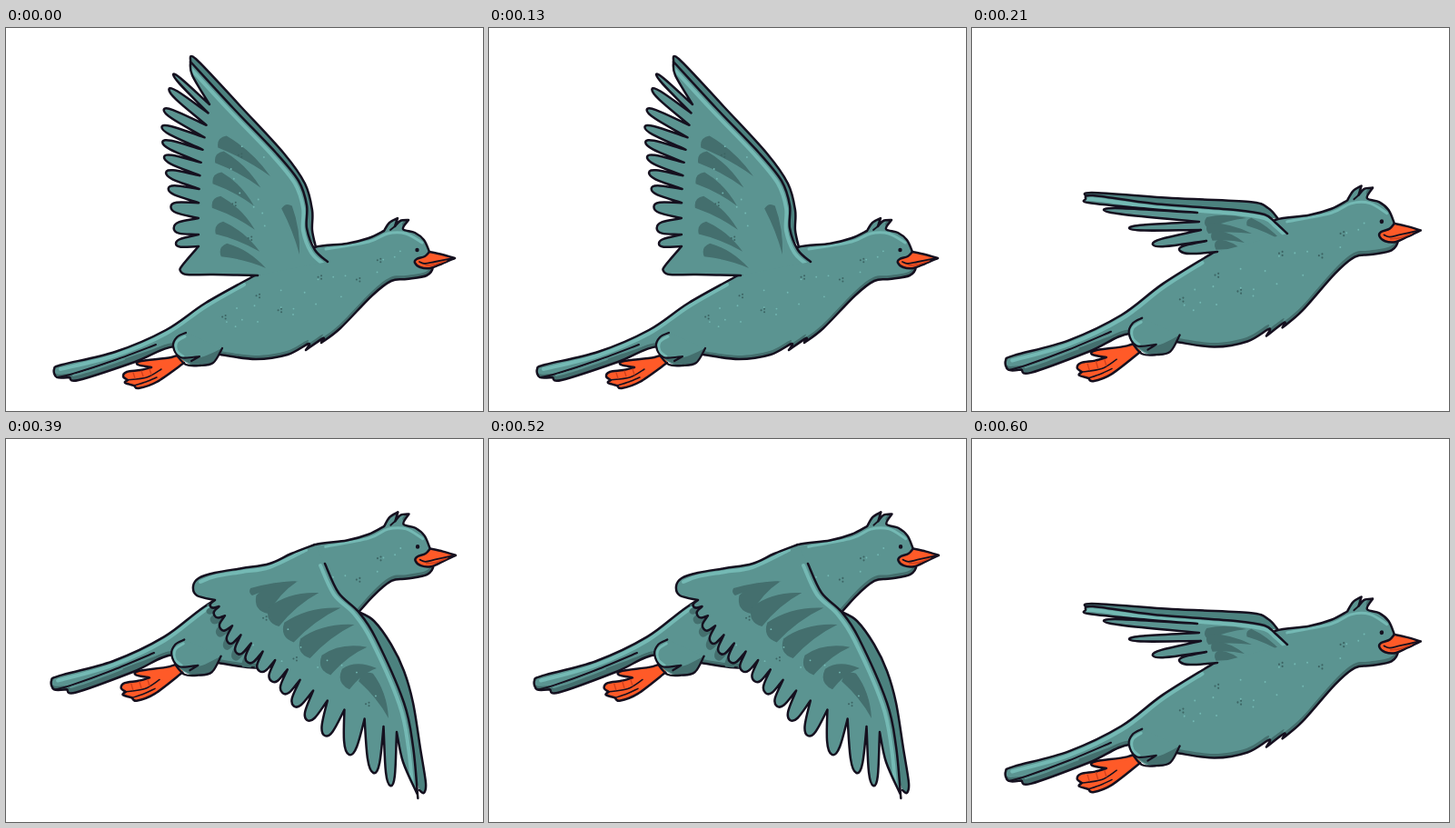
Recreate the animation shown at these times as an HTML page. Size 525 px wide and 421 px high, loop 780 ms.

```html
<!DOCTYPE html>
<html lang="en">
<head>
<meta charset="utf-8">
<title>Flying bird</title>
<style>
html, body { margin: 0; width: 100%; height: 100%; overflow: hidden; background: #fff; }
svg { display: block; width: 525px; height: 421px; }
path { vector-effect: non-scaling-stroke; }
</style>
</head>
<body>
<svg id="stage" viewBox="0 0 525 421" xmlns="http://www.w3.org/2000/svg"></svg>
<script>
const INK = '#15101f', MAIN = '#5b9491', LIGHT = '#74b9b4', DARK = '#446f6e';
const ORANGE = '#ff5a28', RUST = '#cf3f1c';

const points = text => text.trim().split(/\s+/).map(q => q.split(',').map(Number));
const mix = (a, b, t) => a.map((v, k) => v + (b[k] - v) * t);

// Point at share u (0 to 1) of a smooth curve through the keys.
function along(keys, u) {
  const n = keys.length - 1;
  const i = Math.min(n - 1, Math.floor(u * n)), t = u * n - i;
  const [a, b, c, d] = [i - 1, i, i + 1, i + 2].map(k => keys[Math.max(0, Math.min(n, k))]);
  return b.map((v, k) => v + t / 2 * (c[k] - a[k]
    + t * (2 * a[k] - 5 * v + 4 * c[k] - d[k] + t * (3 * (v - c[k]) + d[k] - a[k]))));
}

function spline(p) {
  let d = '';
  for (let i = 0; i < p.length - 1; i++) {
    const a = p[i], b = p[i + 1], before = p[i - 1] || a, after = p[i + 2] || b;
    const c1 = a.map((v, k) => v + (b[k] - before[k]) / 6);
    const c2 = b.map((v, k) => v - (after[k] - a[k]) / 6);
    d += `C${c1} ${c2} ${b}`;
  }
  return d;
}

// Row of rounded feathers: tips on one curve, gaps between them on another.
function fan(count, tipKeys, gapKeys) {
  const tips = points(tipKeys), gaps = points(gapKeys);
  let d = '';
  for (let i = 0; i < count; i++) {
    const a = along(gaps, i / count), b = along(gaps, (i + 1) / count);
    const tip = along(tips, i / (count - 1));
    const span = Math.hypot(a[0] - b[0], a[1] - b[1]);
    const w = Math.min(8, span * 0.45) / span;
    const push = (p, s) => p.map((v, k) => v + s * (a[k] - b[k]));
    d += `C${push(mix(a, tip, 0.5), 0.15)} ${push(tip, w)} ${tip}`
      + `C${push(tip, -w)} ${push(mix(b, tip, 0.5), -0.15)} ${b}`;
  }
  return { d, end: gaps[gaps.length - 1] };
}

// Joins smooth runs, with a corner at each "|", and feather rows.
function path(...parts) {
  let d = '', last;
  for (const part of parts) {
    if (part.d) {
      d += part.d;
      last = part.end;
      continue;
    }
    for (const run of part.split('|')) {
      const p = points(run);
      if (last) p.unshift(last); else d = 'M' + p[0];
      d += spline(p);
      last = p[p.length - 1];
    }
  }
  return d;
}

const fill = (d, color) => `<path d="${d}Z" fill="${color}"/>`;
const line = (d, color = INK, w = 2) => `<path d="${d}" fill="none" stroke="${color}" stroke-width="${w}"/>`;
const inked = (d, color = MAIN) => fill(d, color) + line(d, INK, 2.5);
const move = (at, content) => `<g transform="translate(${at})">${content}</g>`;
const dot = ([x, y], color, r) => `<circle cx="${x}" cy="${y}" r="${r}" fill="${color}"/>`;

let clips = 0;
function inside(d, content, matrix = '1 0 0 1 0 0') {
  const id = 'clip' + clips++;
  return `<clipPath id="${id}"><path d="${d}Z" transform="matrix(${matrix})"/></clipPath>`
    + `<g clip-path="url(#${id})">${content}</g>`;
}

// Leaf with a round tip of radius r, narrowing to a point at the end.
function leaf(tip, end, r) {
  const len = Math.hypot(end[0] - tip[0], end[1] - tip[1]);
  const ux = (end[0] - tip[0]) / len * r, uy = (end[1] - tip[1]) / len * r;
  const mid = mix(tip, end, 0.5);
  const off = ([x, y], s) => [x + uy * s, y - ux * s];
  return fill(`M${end}Q${off(mid, 1.4)} ${off(tip, 1)}Q${[tip[0] - ux, tip[1] - uy]} ${off(tip, -1)}Q${off(mid, 0)} ${end}`, DARK);
}

function coverts(count, tipKeys, endKeys, r) {
  const tips = points(tipKeys), ends = points(endKeys);
  return Array.from({ length: count }, (_, i) => i / (count - 1))
    .map(u => leaf(along(tips, u), along(ends, u), r)).join('');
}

let seed = 7;
const random = () => (seed = seed * 16807 % 2147483647) / 2147483647;

// Pale specks and dark triple dots scattered around a line.
function specks(from, to, spread, count) {
  let out = '';
  for (let i = 0; i < count; i++) {
    const [x, y] = mix(from, to, (i + random()) / count).map(v => v + (random() - 0.5) * 2 * spread);
    out += i % 5 ? dot([x, y], LIGHT, 0.9)
      : [[-2, 0], [1.5, -1.5], [1.5, 2]].map(([a, b]) => dot([x + a, y + b], '#3c6463', 1)).join('');
  }
  return out;
}

const body = path('274,272 300,262 325,254 340,241 375,237 399,231 416,223 | 422,214 431,209 | 428,218 | 434,212 443,211'
  + '| 437,221 450,225 460,233 466,246 | 470,262 463,272 441,276 424,278 403,294 368,330 347,346 | 349,341 330,354 | 333,347 310,359 275,364 236,359'
  + '| 186,350 142,367 80,387 70,384 | 56,384 53,375 62,370 120,356 176,332 220,302 274,272');

const beak = inked(path('494,253 480,249 466,246 | 461,251 452,254 450,258 456,263 467,264 480,259 494,253'), ORANGE)
  + line(path('462,261 472,260 484,256'), RUST, 1.6)
  + line(path('455,257 461,259 472,257 492,253'), INK, 1.8);

const foot = inked(path('197,356 182,362 149,366 145,370 160,373 | 148,376 133,378 129,383 134,387'
  + '| 131,390 141,393 | 146,396 166,389 196,368'), ORANGE)
  + line(path('133,387 155,384 171,375'), INK, 1.5)
  + line(path('141,393 154,389 166,384'), INK, 1.5)
  + [0, 1, 2].map(i => line(`M${140 + i * 9},${379 - i * 2}l2,6`, RUST, 1.3)).join('');

const thigh = fill(path('199,335 186,343 186,357 209,371 238,352'), MAIN)
  + fill(path('190,362 214,362 238,352 | 226,369 209,371 190,362'), DARK)
  + line(path('197,339 188,345 188,355 195,361'), LIGHT, 3)
  + line(path('198,335 188,340 184,350 192,362 213,361 | 204,366'), INK, 2.2)
  + line(path('188,360 198,370 213,371 228,368 238,352'), INK, 2.3);

const tail = fill(path('66,384 120,367 180,347 | 142,367 76,388'), DARK)
  + line(path('57,384 74,380 120,365 165,348'))
  + line(path('74,382 95,376 130,364'), MAIN, 2);

// Strip of the body left uncovered by a copy moved up.
const belly = move('-1,-4', `<path d="M0 0H600V600H0Z${body}Z" fill="${DARK}" fill-rule="evenodd"/>`);

const bird = foot + fill(body, MAIN)
  + inside(body, belly + tail
    + line(path('60,375 120,360 176,336 220,306 262,282'), LIGHT, 4)
    + line(path('352,243 399,235 420,226 440,226 458,236'), LIGHT, 3))
  + line(body, INK, 2.5) + line(path('428,218 423,222'), INK, 1.8)
  + thigh + specks([225, 325], [400, 268], 18, 22) + specks([400, 255], [440, 246], 8, 4)
  + beak + dot([452.5, 244], INK, 2.2);

function pose({ matrix, back, wing, lead, shine, marks, shade }) {
  return inked(path(back), '#4c827f')
    + `<g transform="matrix(${matrix})">${bird}</g>`
    + (shade ? inside(body, move(shade, fill(wing, DARK)), matrix) : '')
    + fill(wing, MAIN)
    + inside(wing, move(shine, line(path(lead), LIGHT, 4)) + marks)
    + line(wing, INK, 2.5);
}

function wingUp() {
  const lead = '354,257 340,244 331,220 331,195 322,168 297,137 250,88 203,37';
  return {
    matrix: '1 0 0 1 0 0', lead, shine: '-4,3',
    back: '203,37 209,34 259,87 306,138 329,171 337,200 337,222 341,241',
    wing: path(lead, '205,52 224,84',
      fan(11, '184,51 172,100 174,142 180,186 187,237', '224,84 219,117 214,155 212,196 212,240'),
      '194,261 192,267 199,271 228,271 277,272'),
    marks: coverts(6, '238,125 233,157 232,200 240,244', '291,163 274,188 275,230 286,264', 8)
      + leaf([309, 197], [323, 249], 6) + specks([262, 125], [270, 235], 20, 12)
  };
}

function wingLevel() {
  const lead = '347,226 334,214 322,205 290,200 200,193 133,184 125,188';
  return {
    matrix: '1.036 -0.012 0 1.13 -17.9 -57.5', lead, shine: '0,4',
    back: '127,186 132,181 220,187 305,191 326,198 337,210',
    wing: path(lead, '128,192 185,198 248,203',
      fan(4, '145,200 173,220 199,238 229,245', '248,203 250,213 252,222 258,234 270,246')),
    marks: coverts(4, '259,214 261,220 266,228 270,238', '302,209 308,226 300,236 300,246', 6)
      + leaf([305, 213], [341, 234], 5)
  };
}

function wingDown() {
  const lead = '453,391 448,338 438,290 407,219 388,190 366,169 351,137';
  return {
    matrix: '1.009 -0.01 0 1.093 -3.5 -143.7', lead, shine: '-5,2', shade: '-4,7',
    back: '388,190 405,200 424,226 438,255 448,290 456,340 462,378 460,389 455,386',
    wing: path('340,116 314,126 290,137 260,142 230,147 212,153 206,162 210,172 230,177',
      fan(15, '225,184 249,230 292,266 340,317 423,381', '230,177 256,213 303,248 358,290 430,322'),
      '437,355 453,391', lead),
    marks: line(path('330,122 290,141 260,146 230,151 214,157'), LIGHT, 4)
      + leaf([270, 168], [322, 156], 4)
      + coverts(6, '282,182 306,207 336,236 374,264', '320,157 362,180 388,211 408,252', 12)
      + leaf([396, 262], [421, 307], 9) + specks([270, 205], [400, 285], 14, 12)
  };
}

const svg = document.getElementById('stage');
svg.innerHTML = [wingUp(), wingLevel(), wingDown()].map(o =>
  `<g stroke-linejoin="round" stroke-linecap="round">${pose(o)}</g>`).join('');
const poses = [...svg.children];

// Wing beat: up, level, down, level.
const beat = [[210, 0], [390, 1], [600, 2], [780, 1]];

function draw(ms) {
  const t = ms % 780;
  const shown = beat.find(([end]) => t < end)[1];
  poses.forEach((g, i) => g.setAttribute('display', i === shown ? 'inline' : 'none'));
}

const start = performance.now();
function tick() {
  draw(performance.now() - start);
  requestAnimationFrame(tick);
}
tick();
</script>
</body>
</html>
```
